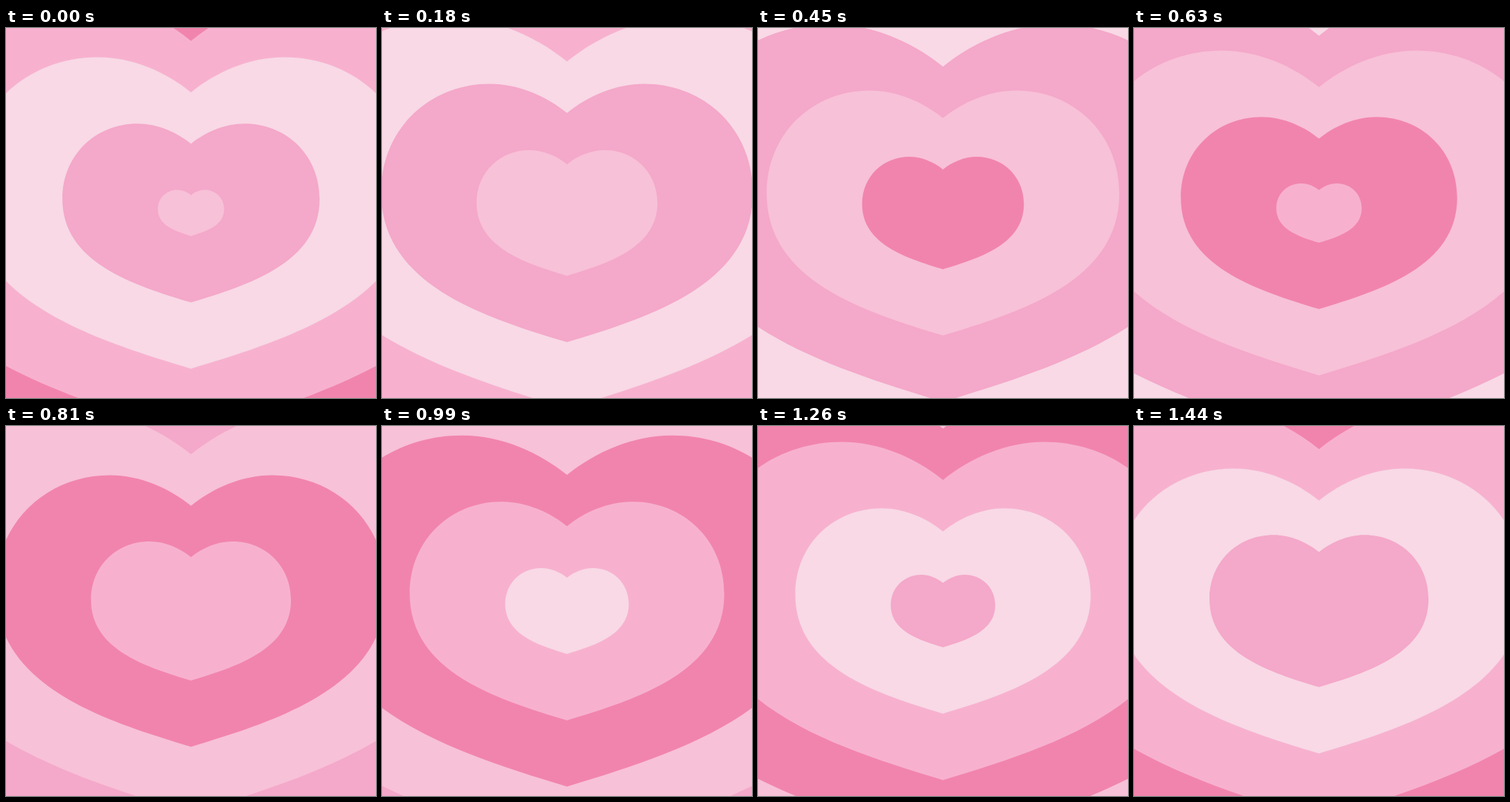
Animation, 500 px wide and 500 px high, one loop 1.53 s. Source, as an HTML page with a canvas:

```html
<!DOCTYPE html>
<html lang="en">
<head>
<meta charset="utf-8">
<title>Growing hearts</title>
<style>
  html, body { margin: 0; width: 100%; height: 100%; overflow: hidden; background: #f8d9e5; }
  canvas { display: block; width: 500px; height: 500px; }
</style>
</head>
<body>
<canvas id="stage" width="500" height="500"></canvas>
<script>
const ctx = document.getElementById('stage').getContext('2d');

const COLORS = ['#f7c1d7', '#f184ad', '#f7b1cf', '#f8d9e5', '#f4a8ca'];
const COUNT = COLORS.length;
const GAP = 300;                      // ms between two hearts
const LIFE = GAP * COUNT;
const STEP = 90, LOOP = 1530;         // the picture advances in steps
const START = 44.8, SPEED = 0.43;     // half width in px, growth in px/ms

// Heart with half width 1, centred on the origin
function makeHeart() {
  const path = new Path2D();
  const notch = -0.5385, height = 0.695, lobe = 0.416, waist = -0.11;
  for (const side of [1, -1]) {
    const curve = (a, b, c, d, x, y) =>
      path.bezierCurveTo(a * side, b, c * side, d, x * side, y);
    path.moveTo(0, notch);
    curve(0.11, -0.628, 0.26, -height, lobe, -height);
    curve(0.736, -height, 1, -0.455, 1, waist);
    curve(1, 0.385, 0.45, 0.559, 0, height);
  }
  return path;
}

const heart = makeHeart();

function draw(t) {
  const newest = Math.floor(t / GAP);
  // Oldest and largest first
  for (let i = COUNT - 1; i >= 0; i--) {
    const age = t % GAP + i * GAP;
    const size = START + SPEED * age;
    ctx.setTransform(size, 0, 0, size, 250, 250);
    ctx.fillStyle = COLORS[(newest - i + COUNT) % COUNT];
    ctx.fill(heart);
  }
}

const begin = performance.now();

function tick() {
  const t = (performance.now() - begin) % LOOP;
  draw(Math.floor(t / STEP) * STEP);
  requestAnimationFrame(tick);
}
tick();
</script>
</body>
</html>
```
